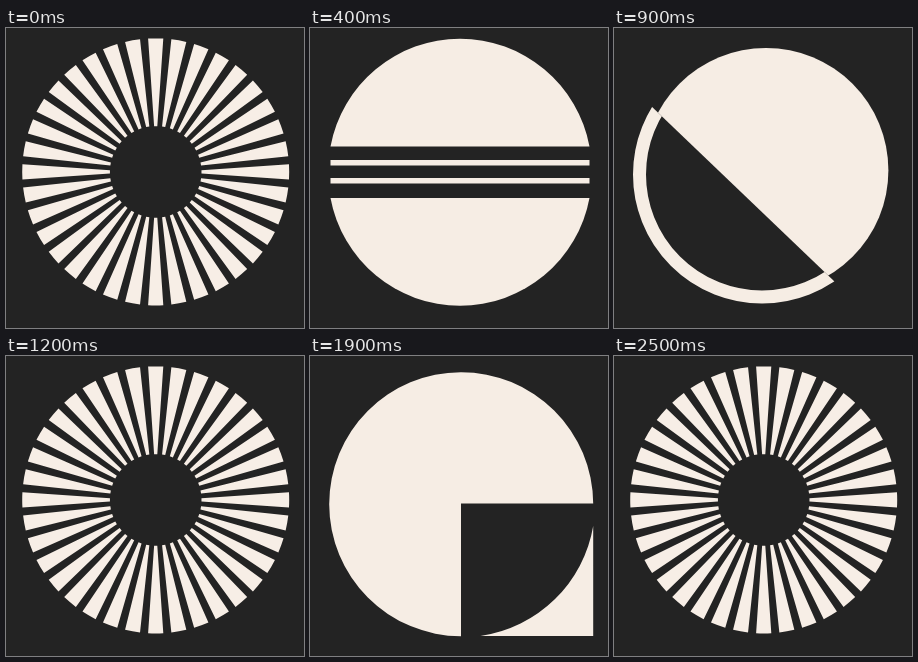
An HTML page for the animation above (2.6 s loop, 298 by 300 pixels).

```html
<!DOCTYPE html>
<html lang="en">
<head>
<meta charset="utf-8">
<title>Circle variations</title>
<style>
html, body { margin: 0; width: 100%; height: 100%; overflow: hidden; background: #232323; }
svg { display: block; width: 100vw; height: 100vh; }
</style>
</head>
<body>
<svg viewBox="0 0 298 300" fill="#f6ede4">
  <defs>
    <clipPath id="disc"><circle cx="149.5" cy="145.5" r="125"/></clipPath>
    <clipPath id="upper"><path d="M-46.6-2L308.4 337.6V-2Z"/></clipPath>
    <clipPath id="lower"><path d="M-46.6-2L308.4 337.6H-46.6Z"/></clipPath>
  </defs>
  <rect width="298" height="300" fill="#232323"/>
  <g id="rays" fill="#f7eee6"><path id="rayPath"/></g>
  <g id="stripes" fill="#f8eee7" clip-path="url(#disc)"><path id="stripePath"/></g>
  <g id="domes">
    <path d="M20.5 118.5A131.7 131.7 0 0 1 279.5 118.5Z"/>
    <path d="M20.5 170A131.7 131.7 0 0 0 279.5 170Z"/>
    <path d="M20.5 132H279.5V137.5H20.5ZM20.5 150H279.5V155.5H20.5Z"/>
  </g>
  <g id="quarter">
    <path d="M283.2 147.5H151V280.2A132 132 0 1 1 283.2 147.5Z"/>
    <path d="M283.2 170A133.6 133.6 0 0 1 170.5 280H283.2Z"/>
  </g>
  <g id="split">
    <circle cx="152" cy="142.3" r="122.4" clip-path="url(#upper)"/>
    <circle cx="148" cy="146.5" r="122.5" fill="none" stroke="#f6ede4" stroke-width="13" clip-path="url(#lower)"/>
  </g>
</svg>
<script>
const $ = id => document.getElementById(id);
const names = ['rays', 'stripes', 'domes', 'quarter', 'split'];
const LOOP = 2600;
const hub = { x: 149.7, y: 143.9 };

// [start time, scene, ray rotation in degrees]
const cues = [
  [0, 'rays', 0], [100, 'rays', 5], [200, 'stripes'], [400, 'domes'],
  [700, 'quarter'], [900, 'split'],
  [1200, 'rays', 0], [1300, 'rays', 5], [1400, 'rays', 0], [1500, 'stripes'],
  [1700, 'domes'], [1900, 'quarter'], [2200, 'split'],
  [2400, 'rays', 5], [2500, 'rays', 0]
];

function rayShape() {
  const inner = 45.8, outer = 133.5;
  const point = (r, a) => `${(hub.x + r * Math.cos(a)).toFixed(2)} ${(hub.y + r * Math.sin(a)).toFixed(2)}`;
  const nearHalf = 1.6 / inner, farHalf = 7.6 / outer;
  let d = '';
  for (let i = 0; i < 36; i++) {
    const a = i * Math.PI / 18;
    d += `M${point(inner, a - nearHalf)}L${point(outer, a - farHalf)}` +
      `A${outer} ${outer} 0 0 1 ${point(outer, a + farHalf)}L${point(inner, a + nearHalf)}Z`;
  }
  return d;
}

// Bars that thin to half height at a step moving left row by row
function stripeShape() {
  let d = '';
  for (let k = 0; k < 10; k++) {
    const top = 18.4 + 27.3 * k, low = top + 18.2, high = top + 9.4;
    const x = 232 - 28 * (k - 3);
    const step = k < 3 ? 'H280' : `H${x - 11}C${x - 1} ${low} ${x - 1} ${high} ${x + 11} ${high}H280`;
    d += `M20 ${top}V${low}${step}V${top}Z`;
  }
  return d;
}

function render(ms) {
  const t = ms % LOOP;
  const [, scene, turn = 0] = cues.filter(c => c[0] <= t).pop();
  names.forEach(n => { $(n).style.display = n === scene ? '' : 'none'; });
  $('rays').setAttribute('transform', `rotate(${turn} ${hub.x} ${hub.y})`);
}

$('rayPath').setAttribute('d', rayShape());
$('stripePath').setAttribute('d', stripeShape());

const start = performance.now();
function tick() {
  render(performance.now() - start);
  requestAnimationFrame(tick);
}
tick();
</script>
</body>
</html>
```
